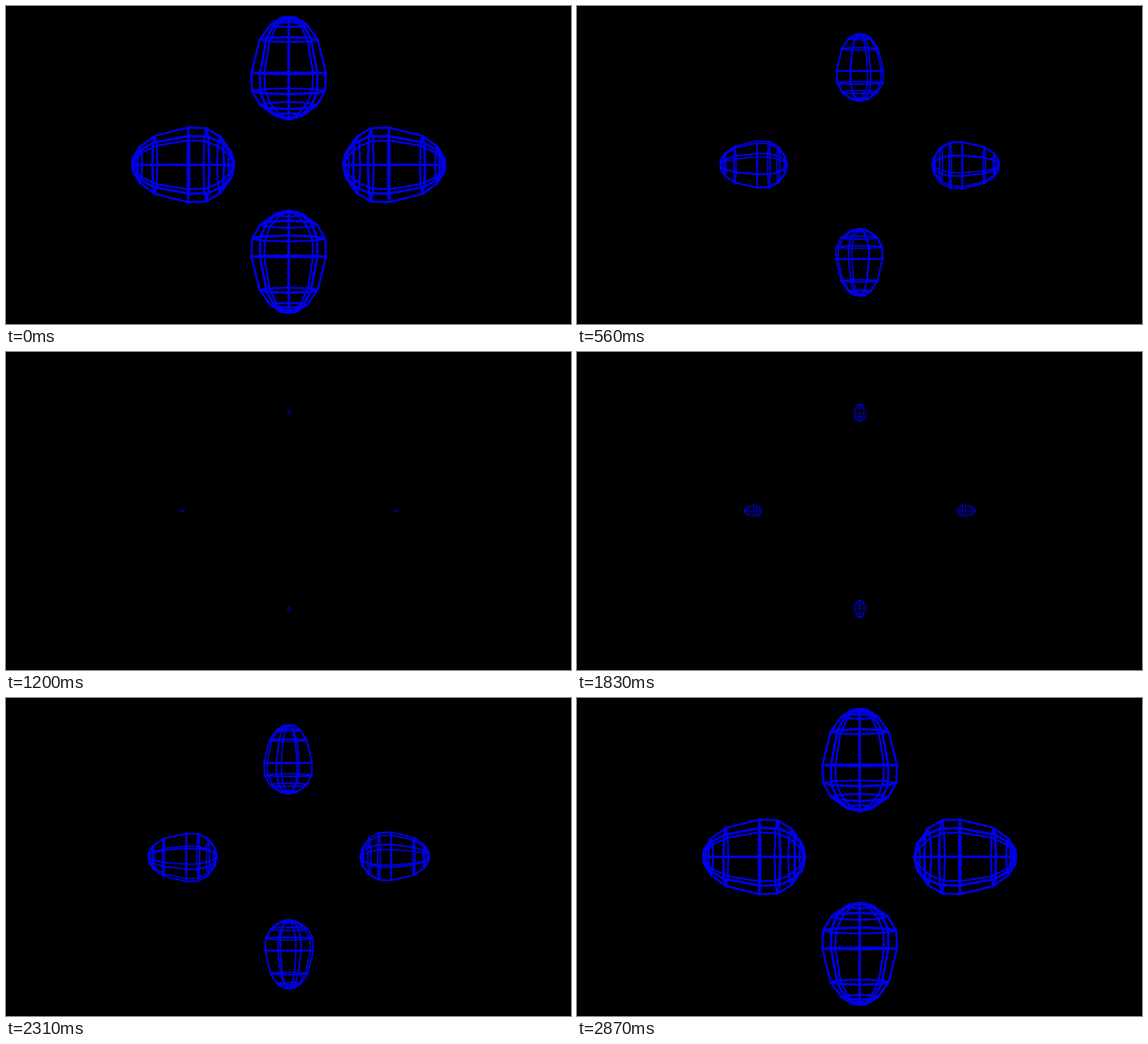
Animation of 998 by 561 pixels, one loop 2.91 s. Source, as an HTML page with a canvas:

```html
<!DOCTYPE html>
<html lang="en">
<head>
<meta charset="utf-8">
<title>Spinning wire eggs</title>
<style>
  html, body { margin: 0; width: 100%; height: 100%; overflow: hidden; background: #000; }
  canvas { display: block; }
</style>
</head>
<body>
<canvas id="stage" width="998" height="561"></canvas>
<script>
const ctx = document.getElementById('stage').getContext('2d');
const TAU = Math.PI * 2;
const LOOP = 2910, STEP = 40, LAST = 71;
const SMALLEST = 35, HALF_TURN = 36;
const CENTRE = [499.3, 280.3];
const SIDES = 8, DEPTH = 545, LINE = 3.8;

// Egg profile from tip to base: [height, radius]
const PROFILE = [
  [-87.2, 0], [-84.5, 15], [-73.8, 32], [-47, 51.3], [11.6, 65.8],
  [43.2, 64.6], [68.2, 50], [86.3, 24.5], [93, 0]
];

// Each egg points away from the centre: [distance, quarter turns]
const EGGS = [[173.6, 0], [189, 1], [173.6, 2], [189, 3]];

// Cubic ease with level handles at 0.39 and 0.61
function ease(x) {
  let lo = 0, hi = 1;
  for (let i = 0; i < 30; i++) {
    const u = (lo + hi) / 2, v = 1 - u;
    if (3 * v * v * u * 0.39 + 3 * v * u * u * 0.61 + u * u * u < x) lo = u;
    else hi = u;
  }
  return lo * lo * (3 - 2 * lo);
}

// The empty pause in the middle is slightly shorter than whole steps.
function stepAt(ms) {
  const k = ms < 1400 ? ms / STEP : LAST - (2870 - ms) / STEP;
  return Math.min(LAST, Math.floor(k + 1e-6));
}

function sizeAt(k) {
  return k < SMALLEST
    ? 1 - ease(k / SMALLEST)
    : ease((k - SMALLEST) / (LAST - SMALLEST));
}

function turnAt(k) {
  const half = k < HALF_TURN
    ? k / HALF_TURN
    : 1 + (k - HALF_TURN) / (LAST - HALF_TURN);
  return -half * Math.PI;
}

function project(row, side, size, turn) {
  const [height, radius] = PROFILE[row];
  const a = turn + side * TAU / SIDES;
  const near = 1 / (1 - radius * Math.sin(a) * size / DEPTH);
  const scale = size * near;
  return { x: radius * Math.cos(a) * scale, y: height * scale, near };
}

function edge(p, q, size) {
  ctx.lineWidth = LINE * size * Math.pow((p.near + q.near) / 2, 1.5);
  ctx.beginPath();
  ctx.moveTo(p.x, p.y);
  ctx.lineTo(q.x, q.y);
  ctx.stroke();
}

function drawEgg(size, turn) {
  const grid = PROFILE.map((_, row) =>
    Array.from({ length: SIDES }, (_, side) => project(row, side, size, turn)));
  grid.forEach((ring, row) => ring.forEach((p, side) => {
    if (PROFILE[row][1]) edge(p, ring[(side + 1) % SIDES], size);
    if (row) edge(grid[row - 1][side], p, size);
  }));
}

function draw(ms) {
  const k = stepAt(ms), size = sizeAt(k), turn = turnAt(k);
  ctx.fillStyle = '#000';
  ctx.fillRect(0, 0, 998, 561);
  if (size < 0.003) return;
  ctx.strokeStyle = '#0000eb';
  ctx.lineCap = 'round';
  for (const [distance, quarter] of EGGS) {
    ctx.save();
    ctx.translate(...CENTRE);
    ctx.rotate(quarter * TAU / 4);
    ctx.translate(0, -distance);
    drawEgg(size, turn);
    ctx.restore();
  }
}

const start = performance.now();
function tick() {
  draw((performance.now() - start) % LOOP);
  requestAnimationFrame(tick);
}
tick();
</script>
</body>
</html>
```
